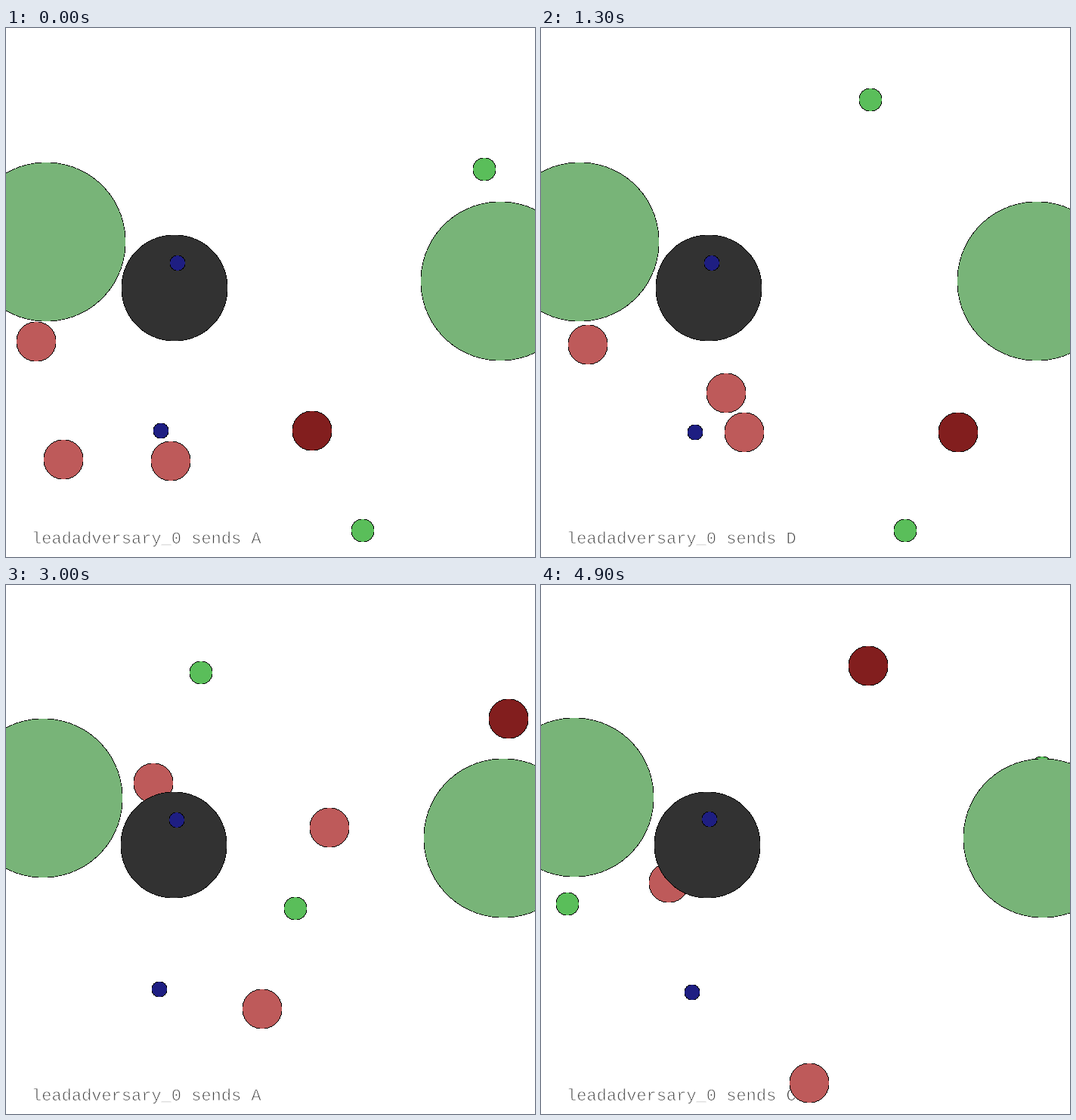
Animation, 700 px wide and 700 px high, one loop 5 s. Source, as a matplotlib script:

```python
import numpy as np
import matplotlib.pyplot as plt
from matplotlib.animation import FuncAnimation
from matplotlib.patches import Circle
from matplotlib.patheffects import Stroke

SIZE, DPI = 700, 100
FRAMES, STEP = 50, 100
HALF, REACH = SIZE / 2, 0.9 * SIZE / 2
PX = 72 / DPI
KEY_FRAMES = np.array([0, 5, 13, 25, 35, 42, 49])


def rgb(*values):
    return tuple(v * 200 / 255 for v in values)


LEAD, CHASER, RUNNER = rgb(.65, .15, .15), rgb(.95, .45, .45), rgb(.45, .95, .45)
ROCK, FOOD, FOREST = rgb(.25, .25, .25), rgb(.15, .15, .65), rgb(.6, .9, .6)


def roam(*waypoints):
    """Smooth path through the waypoints that never overshoots them."""
    p = np.array(waypoints, float)
    span = np.diff(KEY_FRAMES)[:, None]
    speed = np.diff(p, axis=0) / span
    before, after = speed[:-1], speed[1:]
    turning = before * after <= 0
    mean = 2 * before * after / np.where(turning, 1, before + after)
    m = np.vstack([speed[:1], np.where(turning, 0, mean), speed[-1:]])

    frame = np.arange(FRAMES)
    i = np.clip(np.searchsorted(KEY_FRAMES, frame, side="right") - 1, 0, len(span) - 1)
    u = (frame - KEY_FRAMES[i])[:, None] / span[i]
    return (p[i] + (p[i + 1] - p[i]) * u * u * (3 - 2 * u)
            + span[i] * u * (1 - u) * (m[i] * (1 - u) - m[i + 1] * u))


def rest(x, y):
    return np.tile([x, y], (FRAMES, 1))


# World positions, radius and colour; later entries cover earlier ones
ENTITIES = [
    (roam((57, 190), (126, 189), (208, 190), (323.3, -41),
          (317.5, -267), (91, -279), (84, -243)), 26, LEAD),
    (roam((-320, 68), (-220, 48), (-295, 71), (-179, -129),
          (-149, -49), (-229, -117), (-181, 45)), 26, CHASER),
    (roam((-283, 229), (-174, 217), (-83, 190), (136, 204),
          (-158, 236), (32, 301), (6, 310)), 26, CHASER),
    (roam((-136, 231), (-136, 110), (-107, 137), (-10, 71),
          (151, -109), (162, 70), (290, 10)), 26, CHASER),
    (roam((293, -168), (162, -169), (89, -261), (-193, -171),
          (6, -307), (-267, -250), (-316, 73)), 15, RUNNER),
    (roam((127, 325.7), (135, 306), (136, 323.4), (155, -6),
          (-87, 167), (235, 166), (314, -108)), 15, RUNNER),
    (rest(-130.4, -5.5), 70, ROCK),
    (rest(-126.6, -39.6), 10, FOOD),
    (rest(-149.5, 189.97), 10, FOOD),
    (rest(-306.9, -68.5), 105, FOREST),
    (rest(REACH, -14.6), 105, FOREST),
]
MESSAGES = {0: "A", 6: "D", 22: "A", 31: "B", 46: "C"}

fig = plt.figure(figsize=(SIZE / DPI, SIZE / DPI), dpi=DPI, facecolor="white")
ax = fig.add_axes([0, 0, 1, 1])
ax.set_xlim(0, SIZE)
ax.set_ylim(SIZE, 0)
ax.axis("off")


def disc(radius, color, order):
    return ax.add_patch(Circle((0, 0), radius, facecolor=color, linewidth=0,
                               antialiased=False, snap=False, zorder=order))


# A black disc below a slightly smaller one leaves a crisp one-pixel outline
discs = [(disc(radius, "black", k), disc(radius - 0.85, color, k + 0.5))
         for k, (_, radius, color) in enumerate(ENTITIES)]

# The white stroke thins the letters to hairlines
caption = ax.text(34, 682, "", family="Liberation Mono", size=22 * PX, color="0.25",
                  zorder=0.8, path_effects=[Stroke(linewidth=0.8 * PX, foreground="white")])


def draw(frame):
    places = np.array([path[frame] for path, _, _ in ENTITIES])
    zoom = REACH / np.abs(places).max()
    centers = np.floor(places * zoom + HALF + 1e-6)
    for pair, center in zip(discs, centers):
        for patch in pair:
            patch.center = center
    letter = MESSAGES[max(start for start in MESSAGES if start <= frame)]
    caption.set_text(f"leadadversary_0 sends {letter}")
    return [patch for pair in discs for patch in pair] + [caption]


anim = FuncAnimation(fig, draw, frames=FRAMES, interval=STEP, repeat=True, repeat_delay=0)
plt.show()
```
